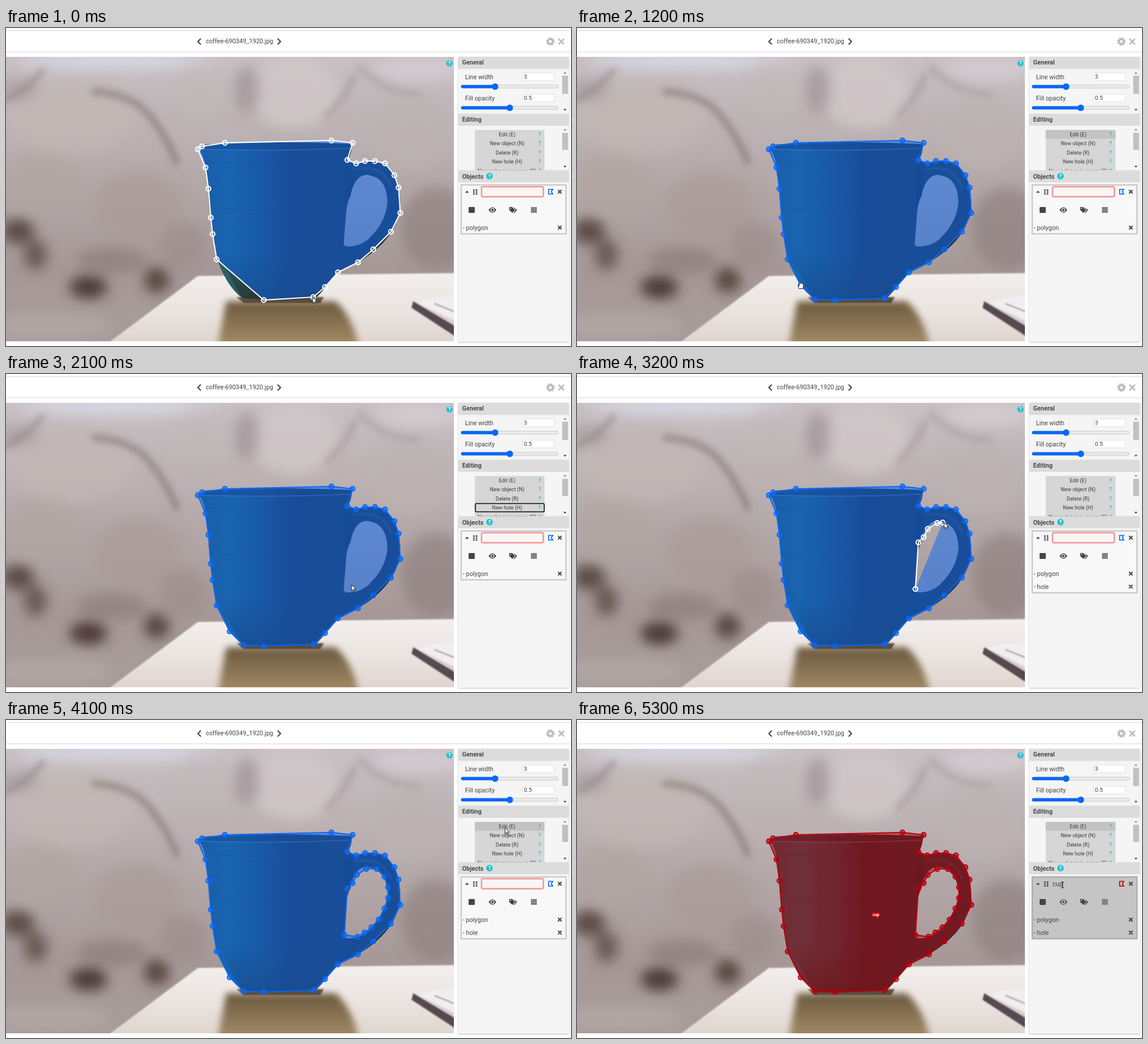
Animation, 960 px wide and 540 px high, one loop 5400 ms. Source, as an HTML page:

```html
<!DOCTYPE html>
<html lang="en">
<head>
<meta charset="utf-8">
<title>Polygon annotation</title>
<style>
  html, body { margin: 0; width: 100%; height: 100%; overflow: hidden; background: #fff; }
  svg { display: block; width: 960px; height: 540px; font-family: Roboto, Inter, sans-serif; font-size: 10.6px; fill: #444; }
  .bold { font-weight: 700; fill: #4a4a4a; }
  .btn { font-size: 8.9px; text-anchor: middle; fill: #3a3a3a; }
  .ask { font-size: 8.5px; font-weight: 700; text-anchor: middle; fill: #19b9c8; }
  .white { fill: #fff; }
  .num { font-size: 9.6px; fill: #333; }
  .line { fill: none; stroke: #444; stroke-linecap: round; stroke-linejoin: round; }
</style>
</head>
<body>
<svg id="stage" viewBox="0 0 960 540">
  <defs>
    <filter id="soft" x="-20%" y="-20%" width="140%" height="140%"><feGaussianBlur stdDeviation="11"/></filter>
    <filter id="mid" x="-20%" y="-20%" width="140%" height="140%"><feGaussianBlur stdDeviation="6"/></filter>
    <filter id="fine" x="-20%" y="-20%" width="140%" height="140%"><feGaussianBlur stdDeviation="1"/></filter>
    <filter id="drop" x="-10%" y="-10%" width="120%" height="120%"><feDropShadow dx="0" dy="1" stdDeviation="1.8" flood-opacity=".3"/></filter>
    <linearGradient id="wall" x2="0" y2="1">
      <stop offset="0" stop-color="#c8c0c4"/><stop offset=".35" stop-color="#b8adae"/>
      <stop offset=".75" stop-color="#a69897"/><stop offset="1" stop-color="#a89d9b"/>
    </linearGradient>
    <linearGradient id="desk" x2="0" y2="1">
      <stop offset="0" stop-color="#f3efee"/><stop offset=".5" stop-color="#eae3df"/><stop offset="1" stop-color="#ddd2cb"/>
    </linearGradient>
    <linearGradient id="shade" x2="0" y2="1">
      <stop offset="0" stop-color="#5e4a2c"/><stop offset="1" stop-color="#a68c64"/>
    </linearGradient>
    <linearGradient id="glaze" gradientUnits="userSpaceOnUse" x1="335" y1="0" x2="580" y2="0">
      <stop offset="0" stop-color="#2f555c"/><stop offset=".18" stop-color="#2c6068"/>
      <stop offset=".42" stop-color="#2c4a55"/><stop offset=".62" stop-color="#2c3038"/><stop offset="1" stop-color="#2b343a"/>
    </linearGradient>
    <linearGradient id="base" gradientUnits="userSpaceOnUse" x1="0" y1="380" x2="0" y2="462">
      <stop offset="0" stop-color="#2b332b" stop-opacity="0"/><stop offset="1" stop-color="#28302a" stop-opacity=".75"/>
    </linearGradient>
    <clipPath id="photoBox"><rect y="49" width="761" height="483"/></clipPath>
    <clipPath id="menuBox"><rect x="768" y="166" width="178" height="75.5"/></clipPath>
  </defs>

  <path d="M0 4.5H960M0 40.5H960" stroke="#d9d9d9"/>
  <path class="line" d="M330.500 18.500L326 23L330.500 27.500M462 18.500L466.500 23L462 27.500" stroke-width="2"/>
  <text x="339.500" y="26">coffee-690349_1920.jpg</text>
  <circle cx="925" cy="23" r="4.200" fill="none" stroke="#bdbdbd" stroke-width="3.600"/>
  <circle cx="925" cy="23" r="6.300" fill="none" stroke="#bdbdbd" stroke-width="2" stroke-dasharray="2.600 2.350"/>
  <path class="line" d="M939.500 19l8 8m0-8l-8 8" style="stroke:#bdbdbd;stroke-width:2.500"/>

  <g clip-path="url(#photoBox)">
    <rect y="49" width="761" height="483" fill="url(#wall)"/>
    <g id="blobs" filter="url(#soft)"></g>
    <g filter="url(#mid)" fill="none" stroke-linecap="round">
      <path d="M150 108Q215 112 245 150T290 228" stroke="#857674" stroke-width="11" opacity=".65"/>
      <path d="M0 122Q35 105 62 72" stroke="#8d8084" stroke-width="10" opacity=".55"/>
      <path d="M592 82Q575 120 545 150" stroke="#94868a" stroke-width="9" opacity=".5"/>
      <path d="M600 66Q640 110 700 112" stroke="#95888a" stroke-width="9" opacity=".4"/>
    </g>
    <path d="M326 421L780 416V545H160Z" fill="url(#desk)" filter="url(#fine)"/>
    <path d="M374 464H560Q590 490 602 550H358Z" fill="url(#shade)" filter="url(#mid)" opacity=".9"/>
    <path d="M392 457H540L534 467H404Z" fill="#443626" filter="url(#fine)" opacity=".8"/>
    <g filter="url(#fine)">
      <path d="M722 458L770 455V500L700 466Z" fill="#f0eef0"/>
      <path d="M692 464L770 510V528L689 475Z" fill="#574a50"/>
      <path d="M696 466L770 503V510Z" fill="#d4ccd0"/>
      <path d="M728 468l35 14" stroke="#9d9094" stroke-width="2"/>
    </g>
    <path id="cup" fill="url(#glaze)" fill-rule="evenodd" d="M328 206Q331 197 350 197Q460 191 588 197Q588 212 580 226Q596 231 614 227C650 222 668 252 670 295C670 340 640 373 598 398Q572 407 560 419Q545 440 526 459Q464 464 402 459Q376 440 360 396Q347 340 344 285Q342 222 328 206Z
      M586 284C592 258 602 249 616 250C641 253 648 275 648 296C646 330 618 368 585 370Q573 371 574 364L578 312Q580 294 586 284Z"/>
    <path d="M346 300Q351 380 402 459Q464 464 526 459Q555 430 565 380Z" fill="url(#base)"/>
    <path d="M334 199Q460 193 586 198L584 203Q460 208 336 205Z" fill="#263038" opacity=".55"/>
    <path d="M331 206Q460 210 584 204" fill="none" stroke="#8aa0a8" opacity=".45" stroke-width="1.500"/>
    <path d="M344 228Q460 236 578 227M346 305Q460 314 575 306" fill="none" stroke="#1d2a33" opacity=".3" stroke-width="1.500"/>
    <path d="M574 236Q592 232 586 284L577 300Z" fill="#1c242c" opacity=".35" filter="url(#fine)"/>
    <path d="M592 240Q640 229 655 272" fill="none" stroke="#55666e" stroke-width="3" opacity=".45" filter="url(#fine)"/>
    <path d="M586 284C592 258 602 249 616 250M574 367Q575 371 586 370Q604 369 618 356" fill="none" stroke="#c2c6d0" stroke-width="1.300" opacity=".7"/>

    <path id="area" fill-rule="evenodd" fill-opacity=".5"/>
    <g id="lines" fill="none" stroke-width="2" stroke-linejoin="round"></g>
    <g id="tag">
      <rect x="501.500" y="326" width="13" height="9.500" rx="1.500" fill="#b8000c"/>
      <text class="white" x="508" y="333" font-size="7" font-weight="700" text-anchor="middle">cup</text>
    </g>
  </g>

  <g id="panel">
    <rect x="768.500" y="49" width="188" height="483.500" fill="#f5f5f5" filter="url(#drop)"/>
    <path d="M768.500 49h188v20.500h-188zM768.500 145.500h188v20.500h-188zM768.500 241.500h188v20.500h-188z" fill="#dcdcdc"/>
    <text class="bold" x="775" y="61.500">General</text>
    <text class="bold" x="775" y="158.500">Editing</text>
    <text class="bold" x="775" y="255.500">Objects</text>
    <path d="M945 81h10v31h-10zM945 178h10v29h-10z" fill="#c1c1c1"/>
    <path d="M947 77.500l2.700-3 2.700 3zM947 174l2.700-3 2.700 3z" fill="#8a8a8a"/>
    <path d="M947 137.500l2.700 3 2.700-3zM947 234l2.700 3 2.700-3z"/>
    <text x="780" y="86.500">Line width</text>
    <text x="780" y="122.500">Fill opacity</text>
    <g id="sliders"></g>
    <g id="menu" clip-path="url(#menuBox)"></g>
    <rect id="ring" x="797.500" y="220" width="117" height="14" rx="1.500" fill="none" stroke="#111" stroke-width="1.700"/>
    <rect id="card" x="773.500" y="266.500" width="178" height="83" stroke-width="2"/>
    <path d="M780 279.800l3.300-3.600 3.300 3.600z"/>
    <path d="M795 274v9M799.500 274v9" stroke="#444" stroke-width="2.600" stroke-dasharray="2.400 1"/>
    <g id="field">
      <rect x="808" y="269.500" width="105" height="17" rx="2.500" fill="none" stroke="#f7b3b3" stroke-width="3"/>
      <rect id="fieldFill" x="808.500" y="270" width="104" height="16" rx="2" stroke="#e57373"/>
    </g>
    <text id="name" x="808" y="282"></text>
    <path id="shapeIcon" d="M922 274h7l-2.500 4 2.500 4h-7z" fill="none" stroke-width="1.600"/>
    <rect x="786" y="304" width="10.500" height="10" rx="1"/>
    <path d="M820 309q6.500-9 13 0q-6.500 9-13 0z"/>
    <circle cx="826.500" cy="309" r="2.700" fill="none" stroke="#f0f0f0" stroke-width="1.200"/>
    <path d="M855 304h5l5 5-4.700 5-5.300-5zM862 304l6.500 5-5 5.500-1-1 3.500-4.300z"/>
    <circle cx="857.300" cy="306.300" r="1" fill="#f0f0f0"/>
    <path d="M892 304h10v10h-10z" fill="#999"/>
    <path d="M892 305.200h10M892 307.600h10M892 310h10M892 312.400h10" stroke="#444" stroke-width="1.200" stroke-dasharray="1.200"/>
    <text x="776" y="343">- polygon</text>
    <path class="line" d="M938.500 275.500l5 5m0-5l-5 5M938.500 336.500l5 5m0-5l-5 5" stroke-width="1.900"/>
    <g id="holeRow">
      <text x="776" y="364.500">- hole</text>
      <path class="line" d="M938.500 358.500l5 5m0-5l-5 5" stroke-width="1.900"/>
    </g>
  </g>
  <g fill="#1fc3d0"><circle cx="753.500" cy="60" r="5.300"/><circle cx="821.500" cy="251.500" r="5.500"/></g>
  <text class="ask white" x="753.500" y="63" style="fill:#fff">?</text>
  <text class="ask white" x="821.500" y="254.600" style="fill:#fff">?</text>

  <g id="pointer" stroke-linejoin="round">
    <path id="arrow" d="M0 0V10.200L2.400 8 4 11.700 5.700 11 4.100 7.400H7.400Z" fill="#fff" stroke="#111" stroke-width=".9"/>
    <path id="hand" d="M-3 5.500L-4.200 2Q-4-.5-2.300 1L-2.600-3Q-1.400-4.500-.6-3Q.5-5 1.600-3Q3-4.200 3.500-2Q5-2.400 5 0L4 5.500Z" fill="#fff" stroke="#111" stroke-width=".9"/>
    <path id="beam" d="M-2-5Q0-5 0-4Q0-5 2-5M0-4V4M-2 5Q0 5 0 4Q0 5 2 5" fill="none" stroke="#111" stroke-width="1.100"/>
  </g>
</svg>
<script>
const $ = id => document.getElementById(id);
const LOOP = 5400, STEP = 100;
const BLUE = '#0768f8', RED = '#b4000c', WHITE = '#fff';

// x, y, rx, ry, colour, opacity
const blobs = [
  [190, 55, 170, 16, '#d8d8e2', .9], [110, 150, 115, 65, '#c2b8b6', .8], [20, 105, 35, 18, '#9c9092', .5],
  [490, 110, 75, 60, '#d3c8cb', .8], [410, 105, 22, 40, '#94878a', .6], [330, 100, 50, 45, '#c2b7b9', .6],
  [700, 70, 75, 20, '#d6cdd2', .8], [690, 180, 70, 60, '#bdb2b3', .7], [730, 340, 60, 70, '#8f7f7e', .65],
  [225, 300, 75, 55, '#a89a98', .7], [60, 260, 70, 50, '#b2a6a4', .7], [20, 345, 28, 22, '#49372f', .8],
  [50, 385, 20, 26, '#54433d', .75], [140, 440, 32, 20, '#3c2b25', .85], [256, 428, 22, 22, '#44332d', .8],
  [180, 395, 60, 22, '#877773', .6], [70, 505, 110, 20, '#b5aba9', .7], [300, 370, 40, 40, '#9a8b88', .6]
];
$('blobs').innerHTML = blobs.map(([x, y, rx, ry, c, o]) =>
  `<ellipse cx="${x}" cy="${y}" rx="${rx}" ry="${ry}" fill="${c}" opacity="${o}"/>`).join('');

$('sliders').innerHTML = [[99.5, 831, '3'], [135.500, 856, '0.5']].map(([y, x, value]) => `
  <rect x="773.500" y="${y - 2.500}" width="165" height="5" rx="2.500" fill="#ececec" stroke="#bcbcbc" stroke-width=".8"/>
  <rect x="773" y="${y - 2.800}" width="${x - 773}" height="5.600" rx="2.800" fill="${BLUE}"/>
  <circle cx="${x}" cy="${y}" r="5.500" fill="${BLUE}"/>
  <rect x="877.500" y="${y - 23}" width="54" height="13" rx="1.500" fill="#fff" stroke="#e2e2e2"/>
  <text class="num" x="880" y="${y - 13.200}">${value}</text>`).join('');

const items = ['Edit (E)', 'New object (N)', 'Delete (R)', 'New hole (H)', 'New polygon in group (G)'];
$('menu').innerHTML = '<rect x="796.500" y="173" width="118.500" height="80" rx="1.500" fill="#d6d6d6"/>' +
  '<rect id="editOn" x="796.500" y="173" width="118.500" height="15.300" rx="1.500" fill="#c3c3c3"/>' +
  items.map((s, i) => `<text class="btn" x="851.500" y="${184 + i * 15.400}">${s}</text>
    <text class="ask" x="906.500" y="${184 + i * 15.400}" style="font-weight:500">?</text>`).join('');

const right = [[333, 201], [372, 195], [553, 191], [589, 195], [580, 224], [595, 230], [610, 226], [627, 226],
  [644, 230], [660, 250], [667, 271], [670, 314], [654, 346], [624, 376], [598, 398], [564, 415], [542, 440]];
const left = [[358, 393], [351, 350], [348, 322], [344, 273], [339, 237], [326, 206]];
// time of the click, x, y
const holeClicks = [[2500, 575, 365], [2700, 580, 286], [2800, 589, 277], [2900, 596, 263], [3100, 612, 253],
  [3300, 630, 253], [3300, 643, 266], [3400, 649, 284], [3400, 649, 302], [3500, 643, 320],
  [3500, 633, 339], [3600, 621, 352], [3600, 609, 361], [3700, 597, 368]];
const pointer = [[0, 521, 457], [100, 523, 459], [200, 600, 385], [300, 780, 235], [400, 850, 183], [500, 845, 185],
  [600, 560, 330], [700, 402, 426], [800, 399, 431], [900, 404, 461], [1000, 386, 440], [1100, 381, 427],
  [1200, 380, 437], [1300, 381, 437], [1500, 620, 330], [1700, 850, 229], [1900, 846, 229], [2000, 690, 310],
  [2100, 587, 358], [2200, 577, 364], [2500, 575, 366], [2700, 580, 287], [2900, 597, 263], [3100, 613, 253],
  [3200, 624, 252], [3300, 647, 270], [3400, 650, 304], [3500, 634, 340], [3600, 601, 366], [3700, 597, 368],
  [3900, 640, 330], [4100, 848, 183], [4200, 848, 186], [4300, 838, 232], [4400, 825, 280]];
const dragA = [[800, 399, 431], [900, 404, 461]];
const dragB = [[1100, 381, 427], [1200, 380, 437]];

function along(track, t) {
  const i = track.findIndex(k => k[0] > t);
  if (i < 1) return (i ? track.at(-1) : track[0]).slice(1);
  const [a, b] = [track[i - 1], track[i]], f = (t - a[0]) / (b[0] - a[0]);
  return [a[1] + (b[1] - a[1]) * f, a[2] + (b[2] - a[2]) * f];
}

const path = (pts, close) => pts.length ? 'M' + pts.join('L') + (close ? 'Z' : '') : '';
const show = (id, on) => $(id).style.display = on ? '' : 'none';
const draw = (pts, close, color) => `<path d="${path(pts, close)}" stroke="${color}"/>` +
  pts.map(([x, y]) => `<circle cx="${x}" cy="${y}" r="3.900" stroke="${color}"
    fill="${color === WHITE ? 'none' : color}" fill-opacity=".5"/>`).join('');

function outline(t) {
  const pts = [...right, t < 100 ? [522, 457] : [523, 459], [438, 462]];
  if (t >= 800) pts.push(along(dragA, t));
  if (t >= 1100) pts.push(along(dragB, t));
  return pts.concat(left);
}

function hole(t) {
  const pts = holeClicks.filter(k => k[0] <= t).map(k => k.slice(1));
  if (pts.length && t < 3700) {
    const [x, y] = along(pointer, t), [px, py] = along(pointer, t - STEP);
    pts.push([x + (px - x) * .25, y + (py - y) * .25]);
  }
  return pts;
}

function render(t) {
  const named = t >= 4800, color = named ? RED : BLUE;
  const outer = outline(t), inner = hole(t), [x, y] = along(pointer, t);
  $('area').setAttribute('d', path(outer, true) + path(inner, true));
  $('area').setAttribute('fill', color);
  $('lines').innerHTML = draw(outer, true, t < 200 ? WHITE : color) +
    draw(inner, t >= 3800, t < 3800 ? WHITE : color);
  show('tag', named);

  const edit = t >= 400 && t < 1700 || t >= 4100;
  show('editOn', edit);
  show('ring', t >= 1700 && t < 2500);
  show('holeRow', t >= 2500);
  const over = x > 773 && x < 952 && y > 266 && y < 372;
  $('card').setAttribute('height', t >= 2500 ? 105 : 83);
  $('card').setAttribute('fill', over ? '#c5c5c5' : '#f8f8f8');
  $('card').setAttribute('stroke', over ? '#a6a6a6' : '#c3c3c3');
  show('field', !named);
  $('fieldFill').setAttribute('fill', over ? '#cfcaca' : '#faf5f5');
  $('name').textContent = 'cup'.slice(0, Math.max(0, (t - 4500) / STEP));
  $('shapeIcon').setAttribute('stroke', color);

  const kind = t >= 4400 ? 'beam' : t >= 700 && t <= 1300 ? 'hand' : 'arrow';
  for (const id of ['arrow', 'hand', 'beam']) show(id, id === kind);
  $('pointer').setAttribute('transform', `translate(${x} ${y})`);
}

const start = performance.now();
let last = -1;
function tick() {
  const t = Math.floor((performance.now() - start) % LOOP / STEP) * STEP;
  if (t !== last) render(last = t);
  requestAnimationFrame(tick);
}
tick();
</script>
</body>
</html>
```
